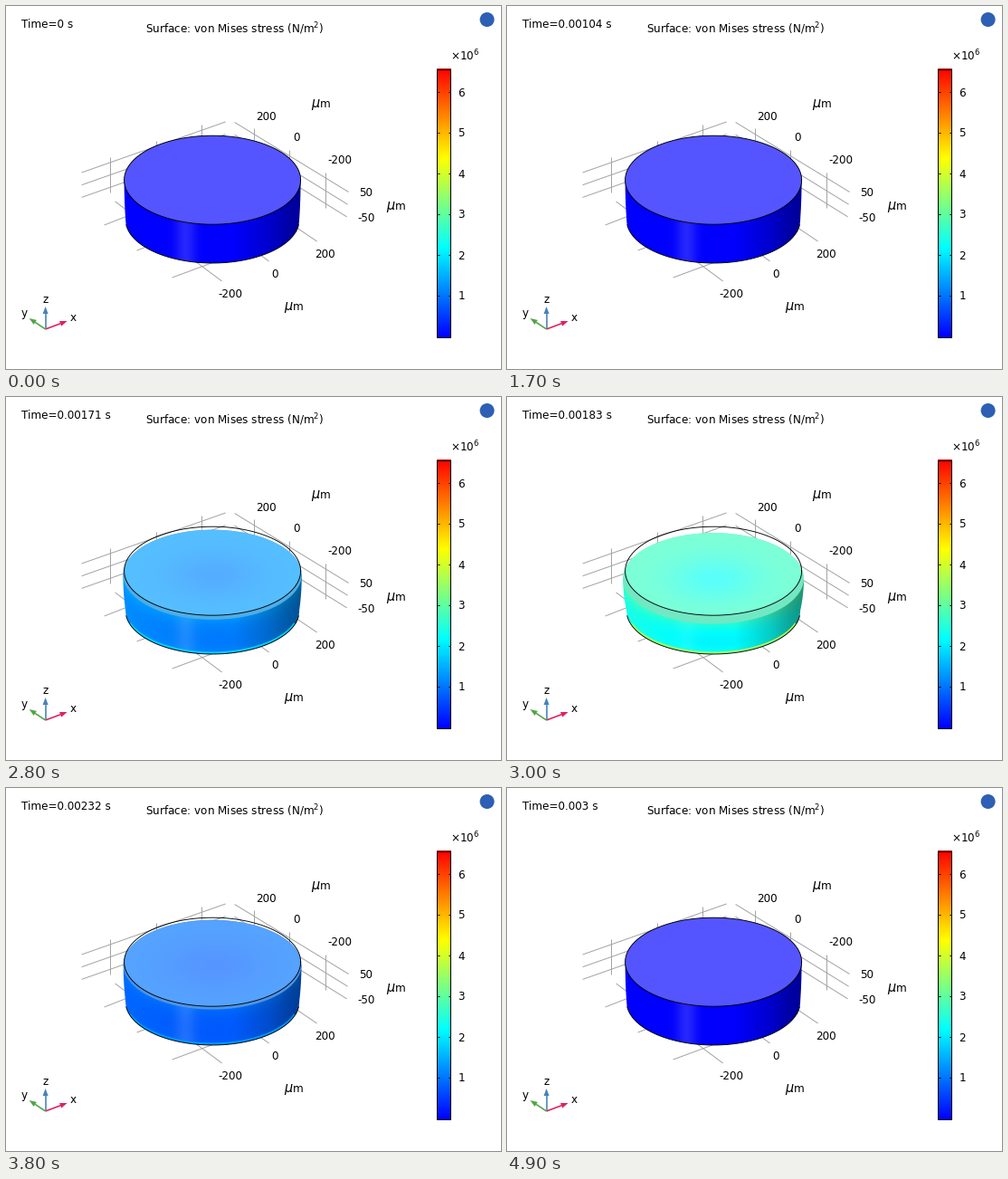
These frames come from a looping animation (547 px wide and 401 px high, 5000 ms). A matplotlib script:

```python
import numpy as np
import matplotlib.pyplot as plt
from matplotlib.animation import FuncAnimation
from matplotlib.patches import Circle, Polygon, Rectangle
from matplotlib.path import Path

W, H, DPI = 547, 401, 64
PT = 72 / DPI                      # points per pixel
FRAMES, INTERVAL = 50, 100
MAX_STRESS = 6.58
CX = 228.5
TOP_Y, TOP_RX, TOP_RY = 192.2, 97.5, 49
BASE_Y, BASE_RX, BASE_RY = 236, 96, 48

plt.rcParams["font.family"] = "DejaVu Sans"
plt.rcParams["mathtext.fontset"] = "dejavusans"

fig = plt.figure(figsize=(W / DPI, H / DPI), dpi=DPI, facecolor="white")
ax = fig.add_axes([0, 0, 1, 1])
ax.axis("off")


def label(x, y, text, size=12, ha="center", **kw):
    return ax.text(x, y, text, fontsize=size * PT, ha=ha, va="baseline", **kw)


def line(x0, y0, x1, y1, color="#a4a4a4", width=1, z=1):
    ax.plot([x0, x1], [y0, y1], color=color, lw=width * PT, zorder=z,
            solid_capstyle="butt")


def arc(cy, rx, ry, start=0, end=2 * np.pi):
    a = np.linspace(start, end, 121)
    return np.column_stack([CX + rx * np.cos(a), cy + ry * np.sin(a)])


def rainbow(stress):
    s = np.clip(np.asarray(stress) / MAX_STRESS, 0, 1)
    stops = [0, 1 / 3, 2 / 3, 1]
    return np.stack([np.interp(s, stops, c) for c in
                     ([0, 0, 1, 1], [0, 1, 1, 0], [1, 1, 0, 0])], axis=-1)


def draw_grid():
    for dy in (0, 13.7, 27.4):
        line(84, 184 + dy, 243, 128 + dy)
        line(253, 128.5 + dy, 379 - dy / 14, 205.5 + dy)
    for x, y in ((115, 167), (166, 149), (216, 131),
                 (274, 135), (313, 159), (353, 184)):
        line(x, y, x, y + 39)
    # floor
    line(109, 242, 150, 226)
    line(145, 270, 185, 255)
    line(184, 300, 322, 249)
    line(121, 216, 239, 304)
    line(200, 216, 291, 282)
    line(270, 210, 344, 260)


def draw_labels():
    label(154, 29.8, r"Surface: von Mises stress (N/m$^2$)", ha="left")
    for x, y, text in ((288, 126, "200"), (321.5, 149, "0"), (369, 174, "-200"),
                       (398, 210.5, "50"), (398, 238.5, "-50"),
                       (353, 278.5, "200"), (297.5, 300.5, "0"),
                       (248.5, 322.5, "-200")):
        label(x, y, text)
    for x, y in ((348, 112), (431, 225), (318, 336)):
        label(x, y, r"$\mu$", 14.5, "right")
        label(x - .5, y, "m", 12, "left")


def draw_colorbar():
    ramp = rainbow(np.linspace(MAX_STRESS, 0, 296))[:, None]
    ax.imshow(ramp, extent=(476, 492, 366, 69), aspect="auto", zorder=2)
    ax.add_patch(Rectangle((476.5, 69.5), 15, 296, fill=False, ec="black",
                           lw=PT, zorder=3))
    for n in range(1, 7):
        y = 365 - 45 * n
        line(477, y, 479, y, "black", 1, 4)
        line(489, y, 491, y, "black", 1, 4)
        label(503.5, y + 4.5, str(n))
    label(491, 60, r"$\times$10$^6$", ha="left")


def draw_triad():
    origin = np.array([44, 357])
    for tip, color, name, at in (((44, 332), "#4682b9", "z", (44, 328)),
                                 ((68, 348), "#e0205c", "x", (74.5, 348)),
                                 ((26, 345), "#50a546", "y", (21, 343))):
        tip = np.array(tip)
        along = (tip - origin) / np.hypot(*(tip - origin))
        side = np.array([-along[1], along[0]])
        neck = tip - 8 * along
        line(*origin, *neck, color, 1.6, 3)
        ax.add_patch(Polygon([tip, neck + 3 * side, neck - 3 * side],
                             fc=color, ec="none", zorder=4))
        label(*at, name)


draw_grid()
draw_labels()
draw_colorbar()
draw_triad()
ax.add_patch(Circle((532, 15), 8, fc="#2d5fb4", ec="none"))
clock = label(17, 24.5, "", ha="left")

# Disc surfaces, shaded per pixel and clipped to their outlines
X0, X1, Y0, Y1 = 125, 332, 138, 290
gx, gy = np.meshgrid(np.arange(X0, X1), np.arange(Y0, Y1))
extent = (X0, X1, Y1, Y0)
blank = np.ones(gx.shape + (3,))
wall, lip, lid = (ax.imshow(blank, extent=extent, aspect="auto", zorder=z,
                            interpolation="nearest") for z in (5, 7, 8))
shade = np.interp(gx, [128, 250, 270, 290, 310, 326],
                  [1, .99, .9, .8, .66, .58])[..., None]
gloss = (.15 * np.exp(-((gx - 198) / 11) ** 2))[..., None]

front_arc = arc(BASE_Y, BASE_RX, BASE_RY, 0, np.pi)
rim_arc = arc(BASE_Y - 1.6, BASE_RX, BASE_RY, .35, np.pi - .35)
base_edge = arc(BASE_Y, BASE_RX, BASE_RY, .12, np.pi - .12)
rim, = ax.plot(*rim_arc.T, lw=2 * PT, zorder=6)
ax.plot(*base_edge.T, color="black", lw=.9 * PT, zorder=9)
ax.plot(*arc(TOP_Y, TOP_RX, TOP_RY).T, color="black", lw=.9 * PT, zorder=9)
# drawing coordinates name pixel columns; half a pixel nudges them left
ax.set_xlim(.4, W + .4)
ax.set_ylim(H, 0)


def clock_text(i):
    if i == 0 or i >= 17:
        value = f"{(300 * i // 49) / 1e5:g}"
    elif i == 1:
        value = f"{(30000 // 49) / 100:g}E-5"
    else:
        value = f"{(3000 * i // 49) / 100:g}E-4"
    return f"Time={value} s"


def clip(image, points):
    image.set_clip_path(Path(points), ax.transData)


def update(i):
    clock.set_text(clock_text(i))
    # Gaussian load pulse: centred at 2 ms, 0.2 ms wide
    load = np.exp(-.5 * ((3 * i / 49 - 2) / .2) ** 2)
    cy = TOP_Y + 11.4 * load
    rx = TOP_RX + 3.4 * load
    ry = TOP_RY * rx / TOP_RX

    u = (gx - CX) / rx
    r2 = u ** 2 + ((gy - cy) / ry) ** 2
    top = rainbow(load * (3.15 + .65 * (1 - np.exp(-r2 / .25))))
    top += (1 - top) / 3
    lid.set_data(top)
    lip.set_data(top * .91)

    depth = np.sqrt(np.clip(1 - u ** 2, 0, 1))
    below_lip = np.clip(gy - cy - ry * depth, 0, 60)
    above_base = np.clip(BASE_Y + BASE_RY * depth - gy, 0, 60)
    body = rainbow(load * (2.85 + .45 * u ** 2 + .65 * np.exp(-below_lip / 9)
                           + .5 * np.exp(-above_base / 6)))
    body = (body + (1 - body) * gloss * (1 - .7 * load)) * shade
    wall.set_data(np.clip(body, 0, 1))
    rim.set_color(rainbow(5 * load))
    rim.set_alpha(min(1, 6 * load))

    moved_top = arc(cy, rx, ry)
    clip(lip, moved_top)
    # the lid keeps full brightness only inside the resting outline
    inside = moved_top.copy()
    cos_a = np.clip((inside[:, 0] - CX) / TOP_RX, -1, 1)
    limit = TOP_Y + TOP_RY * np.sqrt(1 - cos_a ** 2)
    inside[:, 1] = np.minimum(inside[:, 1], limit)
    inside[:, 0] = CX + cos_a * TOP_RX
    clip(lid, inside)

    # bulging flanks, pinned at the base
    t = np.linspace(0, 1, 12)
    flank_x = rx + (BASE_RX - rx) * t ** 2
    flank_y = cy + (BASE_Y - cy) * t
    left = np.column_stack([CX - flank_x, flank_y])
    right = np.column_stack([CX + flank_x, flank_y])
    clip(wall, np.vstack([left, front_arc[::-1], right[::-1]]))
    return clock, wall, lip, lid, rim


anim = FuncAnimation(fig, update, frames=FRAMES, interval=INTERVAL,
                     repeat=True, repeat_delay=0, blit=False)
plt.show()
```
